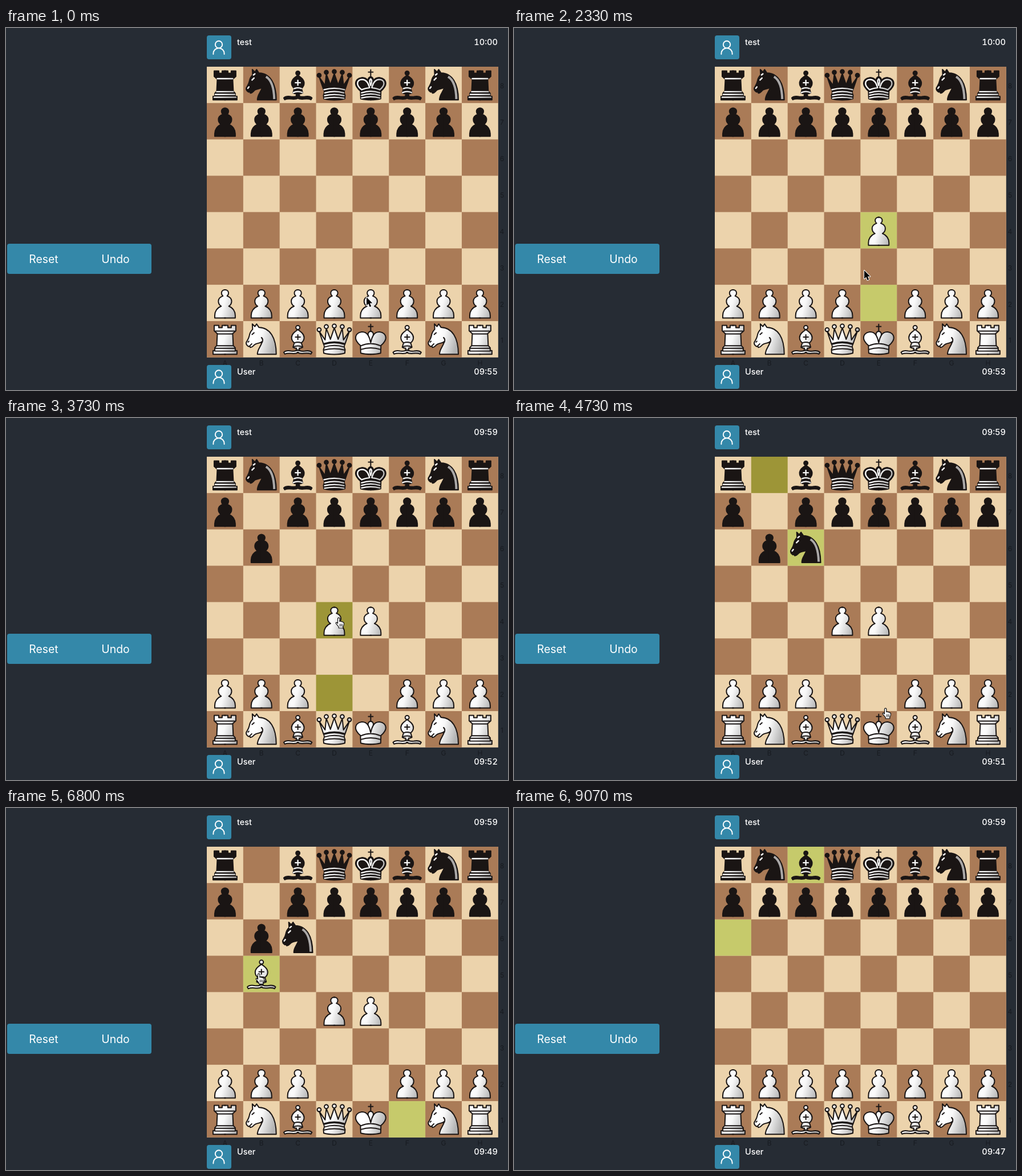
An HTML page with a canvas that plays this animation: 880x636 px, repeating every 9.34 s.

```html
<!DOCTYPE html>
<html lang="en">
<head>
<meta charset="utf-8">
<title>Chess</title>
<style>
  html, body { margin: 0; width: 100%; height: 100%; overflow: hidden; background: #262c34; }
  body { position: relative; font-family: Inter, "Open Sans", sans-serif; color: #fff; }
  canvas { position: absolute; left: 0; top: 0; }
  .label { position: absolute; width: 20px; line-height: 14px; text-align: center; font-size: 12px; color: #181b20; }
  .avatar { position: absolute; left: 352px; width: 42.5px; height: 42.5px; border-radius: 4px; background: #3488a9; }
  .name, .clock { position: absolute; line-height: 20px; font-size: 14.4px; font-weight: 500; }
  .name { left: 405px; }
  .clock { right: 18px; font-size: 14.6px; font-variant-numeric: tabular-nums; }
  .buttons { position: absolute; left: 2px; top: 379px; width: 253px; height: 53px; border-radius: 4px; background: #3488a9; }
  .buttons span { position: absolute; top: 0; width: 127px; line-height: 54px; text-align: center; font-size: 19.4px; }
  .buttons .reset { left: 0; width: 128px; border-radius: 4px 0 0 4px; }
  .buttons .undo { left: 126.5px; }
  .reset.focus { box-shadow: 0 0 0 3.5px rgba(43, 112, 148, .22); }
</style>
</head>
<body>
<div id="labels"></div>
<div class="avatar" style="top:12.5px"></div>
<div class="avatar" style="top:591.5px"></div>
<div class="name" style="top:15px">test</div>
<div class="name" style="top:594px">User</div>
<div class="clock" id="topClock" style="top:15px">10:00</div>
<div class="clock" id="userClock" style="top:594px">09:55</div>
<div class="buttons"><span class="reset" id="reset">Reset</span><span class="undo">Undo</span></div>
<canvas id="stage" width="880" height="636"></canvas>
<script>
const LOOP = 9340, LEFT = 352, TOP = 68, CELL = 63.85;
const INK = '#1a1514', RESET_AT = 8020, SLIDE = 270;
const $ = id => document.getElementById(id);
const ctx = $('stage').getContext('2d');

const ball = (x, y, r) => `M${x} ${y - r}a${r} ${r} 0 1 1 0 ${2 * r}a${r} ${r} 0 1 1 0 ${-2 * r}Z`;

// half: left side, mirrored about x = 32; lines and dark: detail on white and on black pieces
const SHAPES = {
  p: {
    half: 'M33 9H32C28 9 25.8 11.7 25.8 14.8C25.8 17 26.8 18.6 28.3 19.8C23 21.6 20.4 25 20.4 29C20.4 33 22.5 36 25.4 37.8C18 40.5 14 47 14 54V58.5H33'
  },
  r: {
    half: 'M33 7.5H27V11.5H21V7.5H13V17L18.5 22L17.5 43L14 47V52H11V58.5H33',
    lines: 'M15 17.5H49M19 22.5H45M18 43.5H46M15 48H49M14 52.8H50',
    dark: 'M18.5 21H45.5M17.5 44H46.5M15 48.8H49M13 53.8H51'
  },
  b: {
    half: 'M33 51H31C29 52.8 25 53.2 20 52.6C14 51.6 9.5 52.6 7.2 55L9 58C12.5 56.4 17 56.4 22 57C27 57.6 30 57 33 55M33 15H32C27 18.5 21 22.5 21 29C21 33 23 36 25.8 38.2L23.5 46C26 47.5 28 47.7 29.5 47.7L29 51.5H33',
    full: ball(32, 11.3, 3.5),
    lines: 'M32 24V32.5M27.7 28.2H36.3M25.8 38.5Q32 36 38.2 38.5M24 45.5Q32 42 40 45.5'
  },
  n: {
    full: 'M16 5L20.5 9.5L23.5 5L27.5 11C47 11.5 58 29 58 58.5H25C24.5 49.5 31 45.5 33.5 36C29 39.5 25 38.5 21.5 40.5C17.5 42.5 17 46.5 12.5 46.5L11.5 44L9.5 44.8C6.5 43 4.8 40.5 5.3 37.5C7.5 33.5 10 30.5 10.8 25.5C11.5 21 13.5 17.5 16.5 14.5Z',
    lines: 'M15.5 23.5L19 20.5M8.5 37L10 35.5M32 29Q35.5 32 33.5 37M11.5 43.5L15 40',
    dark: 'M15.5 23.5L19 20M8 38L10 35.5M18 14.5L20.5 12.5'
  },
  q: {
    full: 'M5.5 18L15.8 33L18 13L25.2 32L32 12L38.8 32L46 13L48.2 33L58.5 18L51 40C49 44 49 46 51 50L50.5 56.5C41 59.4 23 59.4 13.5 56.5L13 50C15 46 15 44 13 40Z'
      + ball(5.4, 15.2, 3.4) + ball(18, 9.8, 3.4) + ball(32, 8.6, 3.4) + ball(46, 9.8, 3.4) + ball(58.6, 15.2, 3.4),
    lines: 'M14 39.5Q32 34 50 39.5M14 41Q32 35.5 50 41M15 45.5Q32 40.5 49 45.5M14 51Q32 46.5 50 51',
    dark: 'M14 40.5Q32 35.5 50 40.5M15.5 46Q32 41.5 48.5 46M15 51Q32 47 49 51M15 55.5Q32 52.5 49 55.5'
  },
  k: {
    half: 'M33 18H32C29 18 26.5 21 27.5 25C24.5 20.5 20.5 18.8 16 19.2C9.5 19.8 5.5 24 5.5 29.5C5.5 35 9.5 39 14 43L14.5 56.5C20 58 26 58.5 33 58.5',
    lines: 'M14.5 43.5Q32 36 49.5 43.5M14.5 50Q32 44.5 49.5 50M27.5 25Q30.5 30 32 38Q33.5 30 36.5 25',
    dark: 'M16 40.5C10.5 36 8.8 33 8.8 29.5C8.8 25 12.5 22.5 17 22.5C24 22.5 28 29 30 37Q22 38 16 40.5M48 40.5C53.5 36 55.2 33 55.2 29.5C55.2 25 51.5 22.5 47 22.5C40 22.5 36 29 34 37Q42 38 48 40.5M32 21.5Q28.5 24.5 32 33Q35.5 24.5 32 21.5M16 46Q32 40.5 48 46M16 50.5Q32 45.5 48 50.5M16 55Q32 51 48 55',
    cross: 'M32 5.5V17M28 9.5H36'
  }
};

function build(s) {
  const outlines = [];
  if (s.half) {
    const left = new Path2D(s.half), right = new Path2D();
    right.addPath(left, new DOMMatrix([-1, 0, 0, 1, 64, 0]));
    outlines.push(left, right);
  }
  if (s.full) outlines.push(new Path2D(s.full));
  return {
    outlines,
    lines: new Path2D(s.lines || ''),
    dark: new Path2D(s.dark || s.lines || ''),
    cross: new Path2D(s.cross || '')
  };
}
const PATHS = Object.fromEntries(Object.entries(SHAPES).map(([k, s]) => [k, build(s)]));

const shade = ctx.createLinearGradient(20, 30, 55, 40);
shade.addColorStop(0, '#fff');
shade.addColorStop(.3, '#f8f8f8');
shade.addColorStop(1, '#b4b4b4');
const MANE = new Path2D('M40 17.5C49 23 54 36 54.5 57');

const center = sq => [
  LEFT + (sq.charCodeAt(0) - 96.5) * CELL,
  TOP + (8.5 - sq[1]) * CELL
];

const pieces = [];
[...'rnbqkbnr'].forEach((kind, i) => {
  const file = 'abcdefgh'[i];
  pieces.push({ kind, home: file + 8, black: true }, { kind: 'p', home: file + 7, black: true },
    { kind: 'p', home: file + 2 }, { kind, home: file + 1 });
});

// moves with grab are dragged by the pointer, the others slide
const moves = [
  { from: 'e2', to: 'e4', grab: 735, at: 1660 },
  { from: 'b7', to: 'b6', at: 2470 },
  { from: 'd2', to: 'd4', grab: 2930, at: 3660 },
  { from: 'b8', to: 'c6', at: 4460 },
  { from: 'f1', to: 'b5', grab: 5070, at: 6530 },
  { from: 'c8', to: 'a6', at: 7400 }
];
const moveOf = Object.fromEntries(moves.map(m => [m.from, m]));

// pointer tip: time, x, y
const TRACK = [
  [0, 632, 473], [720, 632, 473], [1600, 637, 372], [1800, 637, 362], [2050, 637, 362], [2330, 614, 426],
  [2750, 574, 480], [2930, 574, 480], [3640, 577, 350], [3950, 577, 350],
  [4730, 645, 509], [4980, 698, 542], [5080, 698, 542], [5630, 400, 290],
  [5900, 402, 291], [6450, 437, 290], [6950, 437, 290],
  [7600, 166, 398], [7950, 84, 420], [8200, 84, 420], [8580, -30, 436]
];
const userTicks = [330, 1330, 3660, 4660, 5660, 6660, 7660, 8590];

const clamp = v => Math.max(0, Math.min(1, v));
const mix = (a, b, p) => a + (b - a) * p;
const smooth = p => p * p * (3 - 2 * p);
const cubic = p => p < .5 ? 4 * p ** 3 : 1 - (2 - 2 * p) ** 3 / 2;

function pointerAt(t) {
  const i = TRACK.findIndex(k => k[0] > t);
  if (i < 0) return TRACK[TRACK.length - 1].slice(1);
  const [t0, x0, y0] = TRACK[i - 1], [t1, x1, y1] = TRACK[i];
  const p = smooth((t - t0) / (t1 - t0));
  return [mix(x0, x1, p), mix(y0, y1, p)];
}

function slide(from, to, elapsed) {
  const p = cubic(clamp(elapsed / SLIDE));
  const [x0, y0] = center(from), [x1, y1] = center(to);
  return [mix(x0, x1, p), mix(y0, y1, p)];
}

function place(piece, t, pointer) {
  const m = moveOf[piece.home];
  if (!m || t < (m.grab || m.at)) return center(piece.home);
  if (t >= RESET_AT) return slide(m.to, m.from, t - RESET_AT);
  if (m.grab) return t < m.at ? pointer : center(m.to);
  return slide(m.from, m.to, t - m.at);
}

function drawPiece({ kind, black }, [x, y]) {
  const p = PATHS[kind];
  ctx.save();
  ctx.translate(x - CELL / 2, y - CELL / 2);
  ctx.scale(CELL / 64, CELL / 64);
  ctx.lineJoin = ctx.lineCap = 'round';
  ctx.lineWidth = 2;
  ctx.strokeStyle = INK;
  ctx.fillStyle = black ? INK : shade;
  p.outlines.forEach(o => ctx.fill(o));
  p.outlines.forEach(o => ctx.stroke(o));
  ctx.stroke(p.cross);
  if (black) {
    ctx.strokeStyle = shade;
    ctx.lineWidth = 2.4;
  }
  ctx.stroke(black ? p.dark : p.lines);
  if (black && kind === 'n') {
    ctx.strokeStyle = '#aaa8a8';
    ctx.lineWidth = 4;
    ctx.lineCap = 'butt';
    ctx.stroke(MANE);
  }
  ctx.restore();
}

function drawBoard(last) {
  ctx.fillStyle = '#ecd3ac';
  ctx.fillRect(LEFT, TOP, CELL * 8, CELL * 8);
  for (const f of 'abcdefgh')
    for (let r = 1; r < 9; r++) {
      const light = (f.charCodeAt(0) + r) % 2;
      const marked = last && (last.from === f + r || last.to === f + r);
      if (light && !marked) continue;
      const [x, y] = center(f + r);
      ctx.fillStyle = !marked ? '#aa7b57' : light ? '#c6ca6b' : '#9d9537';
      ctx.fillRect(x - CELL / 2, y - CELL / 2, CELL, CELL);
    }
}

function drawIcon(y) {
  ctx.strokeStyle = '#fff';
  ctx.lineWidth = 1.9;
  ctx.lineCap = 'round';
  ctx.stroke(new Path2D(ball(373, y + 16, 6.2) + `M363.4 ${y + 33}v-1.2a9.6 9.6 0 0 1 19.2 0v1.2`));
}

const ARROW = new Path2D('M0 0V14.6L3.3 11.6L5.6 17L8.2 15.9L5.9 10.6H10.4Z');
const HAND = new Path2D('M4.5 11V3Q4.5 .8 6.2 .8T7.9 3V7.5Q10.2 6.2 10.8 8Q13 7 13.4 9Q15.5 8.6 15.5 10.8Q15.5 14.5 13.8 16.5V19H6.2V17Q4 14 1.6 11.4Q.6 9.6 2.2 9.2Q3.4 9.2 4.5 11Z');
const FINGERS = new Path2D('M8.2 12V16M10.3 12V16M12.4 12V16');

function drawPointer([x, y], t) {
  const hand = t > 730 && t < 2150 || t > 2600 && t < 7080 || t > 7380;
  ctx.save();
  ctx.translate(x, y);
  ctx.lineJoin = 'round';
  if (hand) {
    ctx.fillStyle = '#fff';
    ctx.strokeStyle = '#111';
    ctx.lineWidth = 1.2;
    ctx.fill(HAND);
    ctx.stroke(HAND);
    ctx.lineWidth = .9;
    ctx.stroke(FINGERS);
  } else {
    ctx.strokeStyle = '#fff';
    ctx.lineWidth = 2;
    ctx.stroke(ARROW);
    ctx.fillStyle = '#000';
    ctx.fill(ARROW);
  }
  ctx.restore();
}

function setText(id, text) {
  if ($(id).textContent !== text) $(id).textContent = text;
}

function render(t) {
  const pointer = pointerAt(t);
  ctx.clearRect(0, 0, 880, 636);
  drawBoard(moves.filter(m => t >= m.at).pop());
  const moving = p => p.home in moveOf;
  pieces.filter(p => !moving(p)).forEach(p => drawPiece(p, place(p, t, pointer)));
  [...'cbdef'].forEach(f => pieces.filter(p => moving(p) && p.home[0] === f)
    .sort((a, b) => a.home < b.home ? -1 : 1)
    .forEach(p => drawPiece(p, place(p, t, pointer))));
  drawIcon(13);
  drawIcon(591.5);
  drawPointer(pointer, t);
  setText('topClock', t < 2665 ? '10:00' : '09:59');
  setText('userClock', '09:' + (55 - userTicks.filter(k => t >= k).length));
  $('reset').classList.toggle('focus', t >= RESET_AT - 20 && t < 8560);
}

function addLabel(text, x, y) {
  const el = document.createElement('div');
  el.className = 'label';
  el.textContent = text;
  el.style.left = x - 10 + 'px';
  el.style.top = y - 7 + 'px';
  $('labels').append(el);
}
[...'abcdefgh'].forEach((f, i) => {
  addLabel(f.toUpperCase(), center(f + 1)[0], 588.5);
  addLabel(i + 1, 869.5, center('a' + (i + 1))[1] + 2.5);
});

const start = performance.now();
function tick() {
  render((performance.now() - start) % LOOP);
  requestAnimationFrame(tick);
}
tick();
</script>
</body>
</html>
```
